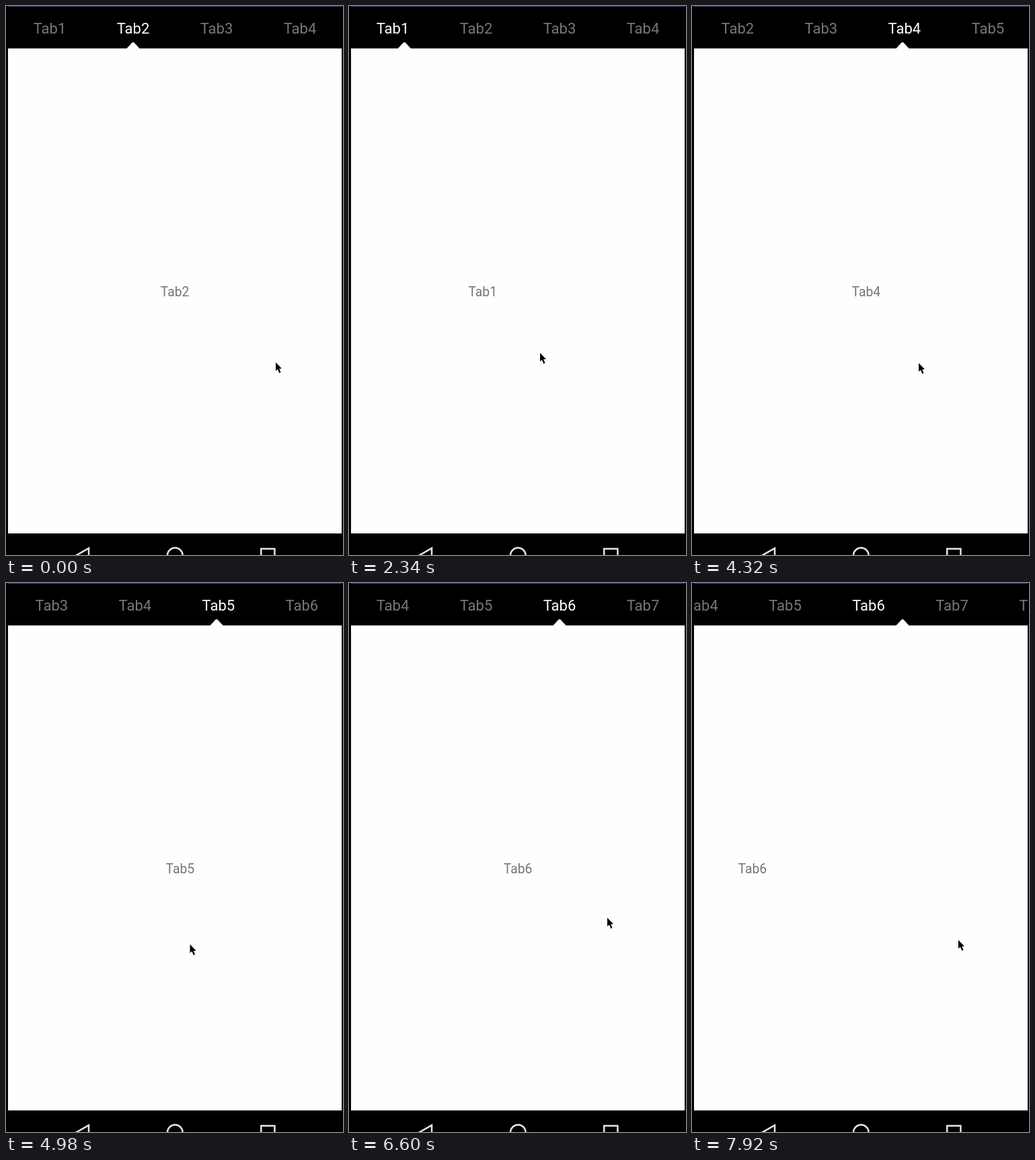
Write an HTML page with a canvas that moves like this. It is 501x815 px and loops after 8 s.

```html
<!DOCTYPE html>
<html lang="en">
<head>
<meta charset="utf-8">
<title>Tabs</title>
<style>
html, body { margin: 0; width: 100%; height: 100%; overflow: hidden; background: #000; }
canvas { display: block; }
</style>
</head>
<body>
<canvas id="stage" width="501" height="815"></canvas>
<script>
const ctx = document.getElementById('stage').getContext('2d');
const LOOP = 8000;
const LEFT = 3, WIDTH = 496, TAB = WIDTH / 4, TABS = 9, MID = LEFT + WIDTH / 2;
const DRAG = 240, SETTLE = 400, TAB_LAG = 17;

// Each swipe: the moment of release and the page it leads to.
const swipe = (release, target, reach = 0.5) => ({ release, target, reach });
const swipes = [
  swipe(830, 2, 0.615), swipe(1560, 1), swipe(2233, 0), swipe(3000, 1), swipe(3620, 2),
  swipe(4120, 3), swipe(4780, 4), swipe(5440, 5), swipe(6980, 6), swipe(7887, 5)
];

// A few resting points of the pointer: time, x, y.
const rests = [
  [0, 401, 529], [1200, 150, 525], [2340, 284, 515], [4320, 337, 530],
  [5640, 210, 543], [6600, 384, 497], [7920, 396, 530], [LOOP, 401, 529]
];

// The screen refreshes unevenly: eight steps to each span.
const spans = [120, 1200, 2340, 3390, 4470, 5520, 6600, 7680, 8640];
const TICK = 30;

function stepTime(t) {
  if (t < spans[0]) return 0;
  const i = spans.findIndex(s => s > t);
  const from = spans[i - 1], step = (spans[i] - from) / 8;
  const n = Math.min(7, Math.floor((t - from + TICK - 1) / step));
  return Math.floor((from + n * step) / TICK) * TICK;
}

const mix = (a, b, k) => a + (b - a) * k;

function pagerAt(t) {
  let page = 1, pos = 1;
  for (const { release, target, reach } of swipes) {
    const drop = mix(page, target, reach);
    if (t < release - DRAG) break;
    if (t < release) {
      const left = (release - t) / DRAG;
      return { page, pos: mix(page, drop, 1 - left ** 4), pressed: true };
    }
    const k = Math.min(1, (t - release) / SETTLE);
    pos = mix(target, drop, (1 - k) ** 5);
    page = target;
  }
  return { page, pos, pressed: false };
}

function pointerAt(t) {
  const i = rests.findIndex(r => r[0] > t);
  const [t0, x0, y0] = rests[i - 1], [t1, x1, y1] = rests[i];
  const k = (t - t0) / (t1 - t0);
  return [mix(x0, x1, k), mix(y0, y1, k)];
}

function rect(x, y, w, h, color) {
  ctx.fillStyle = color;
  ctx.fillRect(x, y, w, h);
}

function label(i, x, y, size, color) {
  ctx.font = size + 'px Roboto, sans-serif';
  ctx.fillStyle = color;
  ctx.fillText('Tab' + (i + 1), x, y);
}

function drawTabs(pos, page) {
  const scroll = TAB * Math.max(0, pos - 2);
  const center = i => LEFT + TAB * (i + 0.5) - scroll;
  for (let i = 0; i < TABS; i++) {
    label(i, center(i), 41, 22, i === page ? '#fff' : '#777');
  }
  const x = center(pos);
  ctx.fillStyle = '#fefefe';
  ctx.beginPath();
  ctx.moveTo(x - 10, 63.5);
  ctx.lineTo(x - 1.6, 54.5);
  ctx.quadraticCurveTo(x, 53, x + 1.6, 54.5);
  ctx.lineTo(x + 10, 63.5);
  ctx.fill();
}

function drawPages(pos) {
  for (let i = 0; i < TABS; i++) {
    label(i, MID + (i - pos) * WIDTH, 431, 19.3, '#757575');
  }
}

function drawNav() {
  ctx.strokeStyle = '#e6e6e6';
  ctx.lineWidth = 2.5;
  ctx.beginPath();
  ctx.moveTo(123, 830);
  ctx.lineTo(123, 805);
  ctx.lineTo(99, 818.6);
  ctx.stroke();
  ctx.beginPath();
  ctx.arc(251.3, 815.5, 11.3, 0, Math.PI * 2);
  ctx.stroke();
  ctx.strokeRect(379.2, 805.8, 20.2, 20.2);
}

const arrow = new Path2D('M0 0V12.8L2.9 10.2 5.3 16 7.5 15.1 5.2 9.4 9 9.2Z');

function drawPointer(x, y) {
  ctx.save();
  ctx.translate(x, y);
  ctx.fillStyle = '#000';
  ctx.fill(arrow);
  ctx.restore();
}

function draw(t) {
  const { page, pos, pressed } = pagerAt(t);
  rect(0, 0, 501, 815, '#000');
  rect(LEFT, 0, WIDTH, 1, '#303f9f');
  rect(LEFT, 63, WIDTH, 720, '#fefefe');
  drawNav();

  ctx.save();
  ctx.beginPath();
  ctx.rect(LEFT, 0, WIDTH, 783);
  ctx.clip();
  ctx.textAlign = 'center';
  drawTabs(pagerAt(t - TAB_LAG).pos, page);
  drawPages(pos);
  ctx.restore();

  if (!pressed) drawPointer(...pointerAt(t));
}

function tick() {
  draw(stepTime(performance.now() % LOOP));
  requestAnimationFrame(tick);
}
tick();
</script>
</body>
</html>
```
